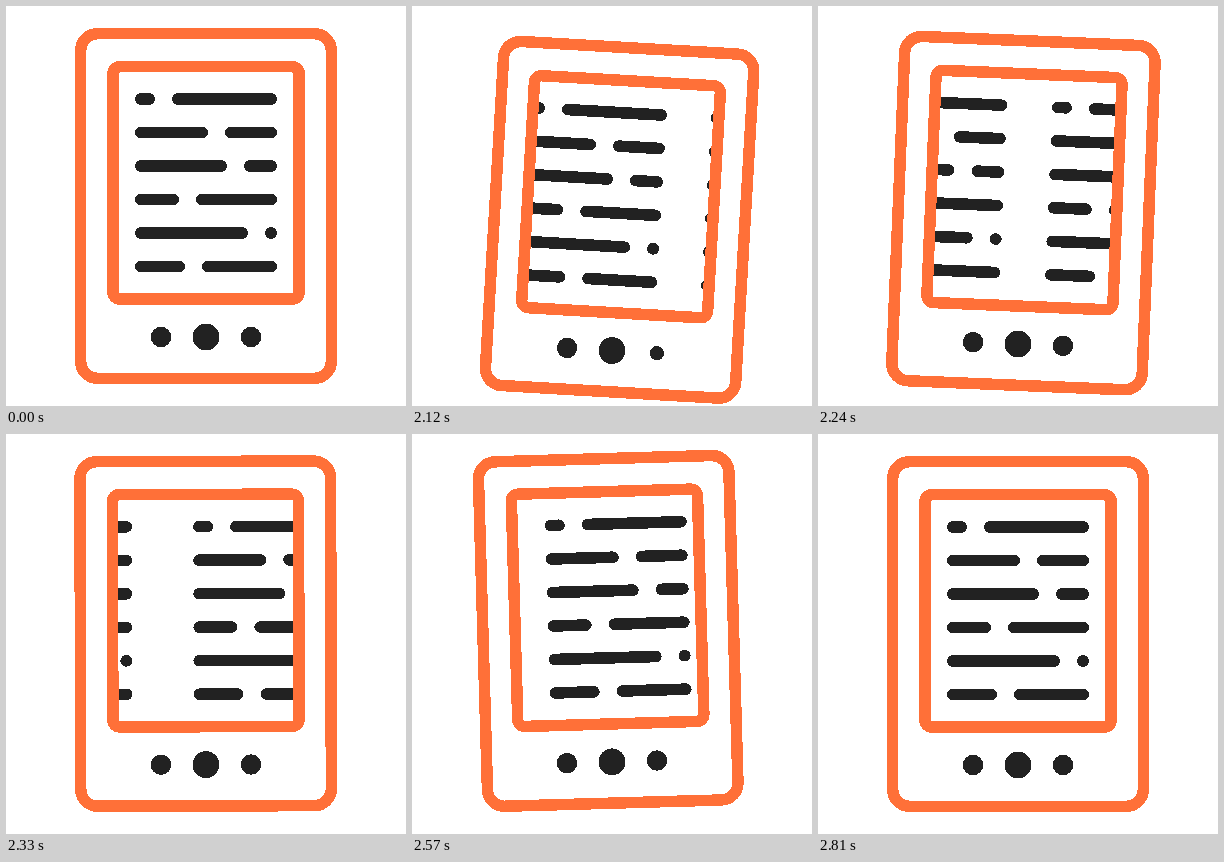
An HTML page that plays this animation: 400x400 px, repeating every 2.84 s.

```html
<!DOCTYPE html>
<html lang="en">
<head>
<meta charset="utf-8">
<title>E-reader page turn</title>
<style>
  html, body { margin: 0; width: 100%; height: 100%; overflow: hidden; background: #fff; }
  svg { display: block; width: 100%; height: 100%; shape-rendering: crispEdges; }
  .frame { fill: none; stroke: #ff7038; stroke-width: 11.5; }
  .line { fill: none; stroke: #222; stroke-width: 11.6; stroke-linecap: round; }
  .button { fill: #222; }
</style>
</head>
<body>
<svg viewBox="0 0 400 400">
  <defs>
    <clipPath id="screen"><rect x="107" y="60.5" width="186" height="232.5"/></clipPath>
  </defs>
  <g id="device">
    <g clip-path="url(#screen)">
      <path id="oldPage" class="line"/>
      <path id="newPage" class="line"/>
    </g>
    <rect class="frame" x="107" y="60.7" width="186.2" height="232.4" rx="7"/>
    <rect class="frame" x="74.7" y="27.7" width="250.6" height="344.6" rx="17"/>
    <circle class="button" cx="155" cy="331" r="10.2"/>
    <circle class="button" cx="200" cy="331" r="13.4"/>
    <circle class="button" id="next" cx="245" cy="331" r="10.2"/>
  </g>
</svg>
<script>
  const LOOP = 2840, START = 2000, STEP = 30;
  const el = id => document.getElementById(id);

  // Each row runs from 129 to 271, broken by one gap
  const LEFT = 129, RIGHT = 271, GAP = 17, CAP = 5.8;
  const dash = (from, to, y) => `M${from + CAP} ${y}H${Math.max(to - CAP, from + CAP + .01)}`;
  const page = [149, 202, 221, 173, 242, 179].map((gap, i) => {
    const y = 93 + 33.5 * i;
    return dash(LEFT, gap, y) + dash(gap + GAP, RIGHT, y);
  }).join('');
  el('oldPage').setAttribute('d', page);
  el('newPage').setAttribute('d', page);

  const clamp = x => Math.min(1, Math.max(0, x));

  // Cubic Bézier easing, solved by bisection
  function bezier(x1, y1, x2, y2) {
    const curve = (a, b, s) => 3 * a * s * (1 - s) ** 2 + 3 * b * s * s * (1 - s) + s ** 3;
    return x => {
      let lo = 0, hi = 1;
      for (let i = 0; i < 24; i++) {
        const mid = (lo + hi) / 2;
        if (curve(x1, x2, mid) < x) lo = mid; else hi = mid;
      }
      return curve(y1, y2, lo);
    };
  }
  const ease = bezier(.25, .1, .25, 1);

  // Swings through key poses [ms, value], flat at the turning points
  const tilt = [[0, 0], [160, 3.95], [322, 0], [470, -2.1], [810, 0]];
  const drop = [[0, 0], [100, 13.8], [240, 7], [415, -4.8], [810, 0]];

  function slope(keys, i) {
    if (i === 0 || i === keys.length - 1) return 0;
    const [[t0, v0], [t1, v1], [t2, v2]] = keys.slice(i - 1, i + 2);
    const before = (v1 - v0) / (t1 - t0), after = (v2 - v1) / (t2 - t1);
    return before * after <= 0 ? 0 : 2 * before * after / (before + after);
  }

  function swing(keys, t) {
    let i = 0;
    while (i < keys.length - 2 && t >= keys[i + 1][0]) i++;
    const [t0, a] = keys[i], [t1, b] = keys[i + 1];
    const span = t1 - t0, p = clamp((t - t0) / span), q = 1 - p;
    return a * q * q * (1 + 2 * p) + b * p * p * (3 - 2 * p)
      + span * p * q * (slope(keys, i) * q - slope(keys, i + 1) * p);
  }

  // The old page picks up speed; the new one eases into place
  const oldX = t => -.648 * (Math.hypot(t, 133) - 133);
  const newX = t => 184 * (1 - ease(clamp((t - 15) / 790)));
  const pressed = t => 10.2 - 3.3 * Math.sin(Math.PI * clamp(t / 240) ** .7);

  function draw(time) {
    const t = Math.max(0, Math.floor((time % LOOP - START) / STEP) * STEP);
    const move = (id, value) => el(id).setAttribute('transform', value);
    move('device', `translate(0 ${swing(drop, t)}) rotate(${swing(tilt, t)} 200 331)`);
    move('oldPage', `translate(${oldX(t)} 0)`);
    move('newPage', `translate(${newX(t)} 0)`);
    el('next').setAttribute('r', pressed(t));
  }

  const begin = performance.now();
  function tick() {
    draw(performance.now() - begin);
    requestAnimationFrame(tick);
  }
  tick();
</script>
</body>
</html>
```
